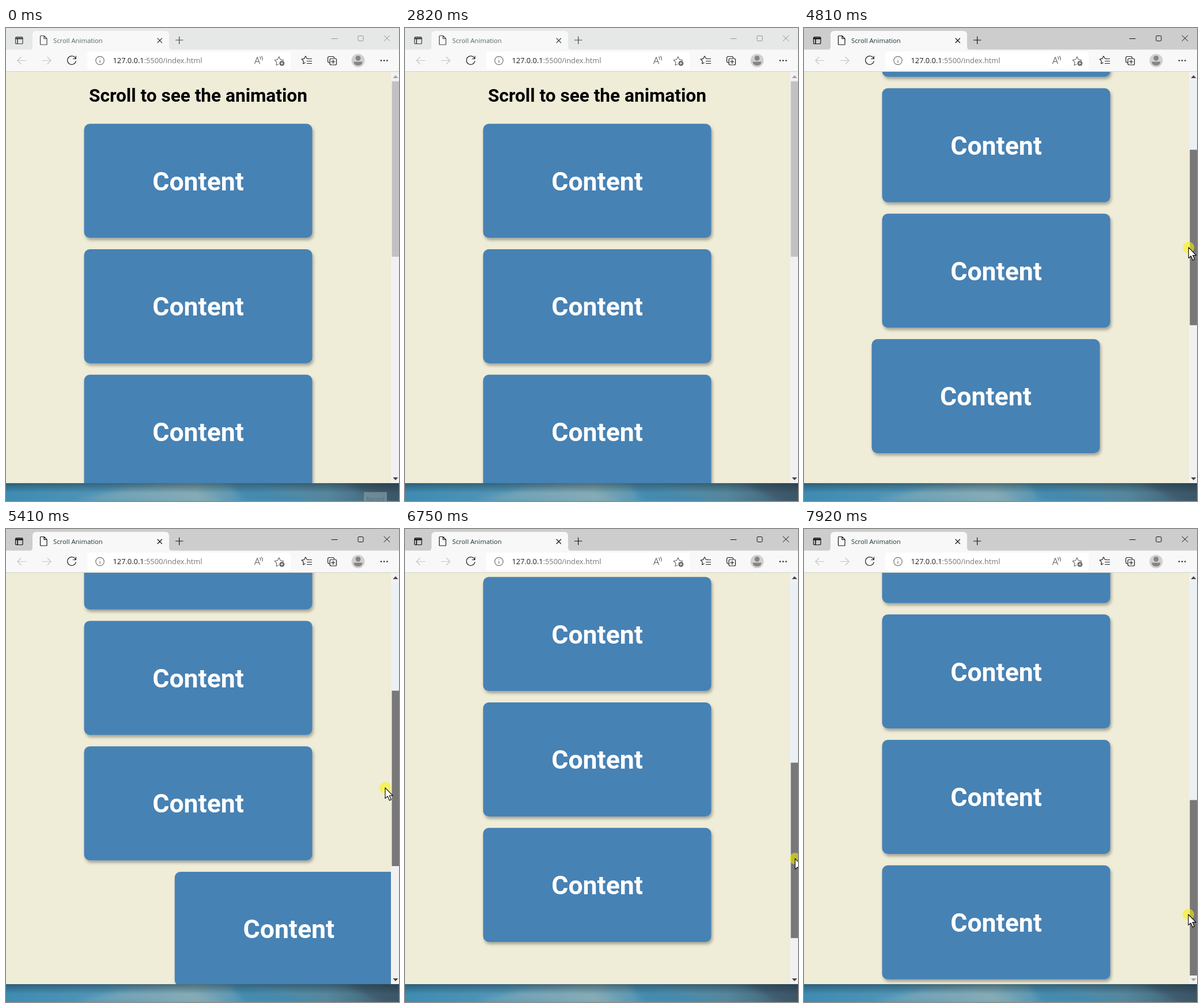
Write an HTML page that moves like this. It is 682 px wide and 821 px high and loops after 8000 ms.

```html
<!DOCTYPE html>
<html lang="en">
<head>
<meta charset="utf-8">
<title>Scroll Animation</title>
<style>
  html, body { margin: 0; width: 100%; height: 100%; overflow: hidden; background: #efecd7; }
  svg { display: block; width: 682px; height: 821px; }
  .ui { font-family: "Open Sans", "Noto Sans", sans-serif; }
  .page { font-family: Roboto, Arial, sans-serif; font-weight: 700; text-anchor: middle; }
  .line { fill: none; stroke-width: 1.2; stroke-linecap: round; stroke-linejoin: round; }
</style>
</head>
<body>
<svg viewBox="0 0 682 821" xmlns="http://www.w3.org/2000/svg">
  <defs>
    <clipPath id="view"><rect y="76" width="668" height="714"/></clipPath>
    <clipPath id="strip"><rect y="790" width="682" height="31"/></clipPath>
    <filter id="shadow" x="-5%" y="-8%" width="112%" height="120%">
      <feDropShadow dx="2" dy="4" stdDeviation="2.4" flood-color="#000" flood-opacity=".3"/>
    </filter>
    <filter id="soft" x="-20%" y="-60%" width="140%" height="220%"><feGaussianBlur stdDeviation="5"/></filter>
    <linearGradient id="desk">
      <stop offset="0" stop-color="#3f8bb2"/>
      <stop offset=".25" stop-color="#5095b7"/>
      <stop offset=".48" stop-color="#7ea7b3"/>
      <stop offset=".62" stop-color="#4f93b4"/>
      <stop offset=".82" stop-color="#55869c"/>
      <stop offset="1" stop-color="#3e5a6b"/>
    </linearGradient>
    <linearGradient id="edge" x2="0" y2="1">
      <stop offset="0" stop-color="#10222c" stop-opacity=".42"/>
      <stop offset="1" stop-color="#10222c" stop-opacity="0"/>
    </linearGradient>
  </defs>

  <!-- desktop -->
  <g clip-path="url(#strip)">
    <rect y="790" width="682" height="31" fill="url(#desk)"/>
    <g filter="url(#soft)">
      <path d="M120 821L210 800L300 797L380 821Z" fill="#8db0b8" opacity=".5"/>
      <path d="M390 790L470 805L540 821H410Z" fill="#3d86ae" opacity=".6"/>
      <path d="M590 790H682V821H650Z" fill="#364e60" opacity=".5"/>
    </g>
    <rect y="790" width="682" height="17" fill="url(#edge)"/>
  </g>
  <g id="record" class="ui">
    <rect x="621" y="805.5" width="40" height="18" fill="#7c97a3" opacity=".75"/>
    <text x="625" y="820.5" font-size="9.6" fill="#526b78">Record</text>
  </g>

  <!-- page -->
  <rect y="75" width="682" height="715" fill="#efecd7"/>
  <g clip-path="url(#view)" class="page">
    <text id="head" x="333.5" font-size="31.6">Scroll to see the animation</text>
    <g id="cards"></g>
  </g>

  <!-- scrollbar -->
  <rect x="668" y="76" width="14" height="714" fill="#f1f1f1"/>
  <rect id="trail" x="668" y="92.5" width="14" fill="#ebf0f5"/>
  <rect id="thumb" x="669.5" width="12.5" height="304.5"/>
  <path id="up" d="M671.5 87L676 82L680.5 87Z"/>
  <path id="down" d="M671.5 780L676 785L680.5 780Z"/>

  <!-- title bar -->
  <rect id="bar" width="682" height="38"/>
  <path d="M40 38Q46 38 46 32V12Q46 5 53 5H276Q283 5 283 12V32Q283 38 289 38Z" fill="#f8f8f8"/>
  <rect y="37.5" width="682" height="37.5" fill="#f8f8f8"/>
  <rect y="75" width="682" height="1" fill="#d3d3cb"/>
  <g id="chrome" class="line">
    <rect x="16.5" y="15.5" width="12.5" height="12" rx="2"/>
    <path d="M17 17.2H28.5M17 18.6H28.5M20 19V27" stroke-width="1.6"/>
    <path d="M59.5 14.5Q59.5 13.5 60.5 13.5H66L71 18.5V28Q71 29 70 29H60.5Q59.5 29 59.5 28ZM66 13.5V18.5H71"/>
    <path d="M263 18L270.5 25.5M270.5 18L263 25.5"/>
    <path d="M294.5 21H307M300.7 15V27.5"/>
  </g>
  <g id="buttons" class="line" style="stroke-width:1">
    <path d="M565 18.5H575M656 13L666 22.5M666 13L656 22.5"/>
    <rect x="611" y="13.5" width="9" height="9" rx="1.5"/>
  </g>
  <text id="tab" class="ui" x="82" y="26" font-size="11.3">Scroll Animation</text>

  <!-- toolbar -->
  <rect x="141" y="41" width="353" height="31" rx="4" fill="#fff"/>
  <g class="line" stroke="#c6c6c6">
    <path d="M35 56.5H20M26 50.5L20 56.5L26 62.5M63 56.5H78M72 50.5L78 56.5L72 62.5"/>
  </g>
  <g class="line" stroke="#242424" stroke-width="1.3">
    <path d="M120.8 53A7.4 7.4 0 1 0 121.3 57.5M121.3 48.8V53.5H116.6"/>
    <path d="M526 53.5L522.3 53L519.8 48.8L517.5 53.3L513 54L516.3 57.3L515.6 62L519 60.2M523.5 53.5H530.5M522.5 57.5H530.5M522.5 61.5H530.5"/>
    <path d="M562 60H561Q558.5 60 558.5 57.5V52Q558.5 49.5 561 49.5H567Q569.5 49.5 569.5 52"/>
    <rect x="562" y="53" width="11.5" height="11" rx="2.3"/>
    <path d="M567.7 55.5V61.5M564.7 58.5H570.7"/>
  </g>
  <g class="line" stroke="#707070" stroke-width="1.1">
    <circle cx="163" cy="56.5" r="7.2"/>
    <path d="M163 56V60M163 53V53.1"/>
    <path d="M431.5 62L436 50.5L440.5 62M433 58.3H439M440.5 50Q442.5 52 441.5 54.5M443.3 49Q446.3 52 444.8 56"/>
    <path d="M473 63L469 64.5L469.8 59.3L466.2 55.5L471.3 54.7L473.8 49.8L476.2 54.7L481.5 55.5L480.5 56.8"/>
  </g>
  <circle cx="478.8" cy="61.3" r="4.4" fill="#666"/>
  <path d="M476.5 61.3H481.1M478.8 59V63.6" stroke="#fff"/>
  <circle cx="611" cy="56.5" r="11.5" fill="#d2d0ce"/>
  <circle cx="611" cy="52.3" r="4.4" fill="#858585"/>
  <path d="M603.5 58.5H618.5Q618.5 65 611 65Q603.5 65 603.5 58.5Z" fill="#858585"/>
  <g fill="#242424"><circle cx="651" cy="56.5" r="1.3"/><circle cx="656.2" cy="56.5" r="1.3"/><circle cx="661.4" cy="56.5" r="1.3"/></g>
  <text class="ui" x="185.5" y="61" font-size="12.8" fill="#1c1c1c">127.0.0.1<tspan fill="#767676">:5500/index.html</tspan></text>

  <g id="cursor">
    <circle r="10" fill="#faf400" fill-opacity=".56"/>
    <path d="M0 0V18.5L4.2 14.8L7.4 22L10.4 20.7L7.3 13.6H13.2Z" fill="#fff" stroke="#000" stroke-width="1.1" stroke-linejoin="round"/>
  </g>
</svg>
<script>
const LOOP = 8000, PRESS = 3790, TRAVEL = 378, MAX_SCROLL = 889;
const FIRST = 166.3, PITCH = 217.75, COUNT = 7, TRIGGER = 648;
const SLIDE = 400, OFFSET = 1584;
const $ = id => document.getElementById(id);
const set = (el, attrs) => { for (const k in attrs) el.setAttribute(k, attrs[k]); };

// [time, thumb travel]
const drag = [[PRESS, 0], [4190, 36], [5160, 165.4], [5410, 188], [6230, 265], [6750, 313], [7920, 407]];

// [time, x, y]; the loop around the page lies between 1950 and 2720
const moves = [
  [490, 640, 835], [540, 641, 821], [640, 650, 819], [890, 650, 819], [1340, 578, 378], [1950, 578, 378],
  [2720, 609, 440], [2770, 668, 502], [2820, 710, 530], [3030, 710, 262], [3070, 679, 261], [3520, 677, 262],
  [PRESS, 677, 262], [4190, 677, 299], [5160, 662, 427], [5410, 658, 449], [6230, 674, 524],
  [6750, 677, 572], [7920, 667, 669]
];

function track(keys, t, col = 1, by = 0) {
  if (t <= keys[0][by]) return keys[0][col];
  for (let i = 1; i < keys.length; i++) {
    const a = keys[i - 1], b = keys[i];
    if (t <= b[by]) return a[col] + (b[col] - a[col]) * (t - a[by]) / (b[by] - a[by]);
  }
  return keys[keys.length - 1][col];
}

// cubic-bezier(.25, .1, .25, 1)
function ease(x) {
  if (x <= 0) return 0;
  if (x >= 1) return 1;
  let lo = 0, hi = 1, s;
  for (let i = 0; i < 20; i++) {
    s = (lo + hi) / 2;
    const bx = .75 * s * (1 - s) + s ** 3;
    if (bx < x) lo = s; else hi = s;
  }
  return .3 * s * (1 - s) ** 2 + 3 * s * s * (1 - s) + s ** 3;
}

const cards = Array.from({ length: COUNT }, (_, i) => {
  $('cards').insertAdjacentHTML('beforeend',
    `<g><rect x="135.5" width="396" height="198" rx="10" fill="#4682b4" filter="url(#shadow)"/>
     <text x="333.5" y="115.3" font-size="44.6" fill="#fff">Content</text></g>`);
  const top = FIRST + PITCH * i;
  const need = (top - TRIGGER) * TRAVEL / MAX_SCROLL;
  return {
    el: $('cards').lastElementChild, top,
    from: i % 2 ? -OFFSET : OFFSET,
    start: need > 0 ? track(drag, need, 0, 1) : -SLIDE
  };
});

function pointer(t) {
  if (t > 1950 && t < 2720) {
    const k = (t - 1950) / 770, a = .372 - 2 * Math.PI * k;
    return [316 + 301 * Math.cos(a) + 12 * k ** 4, 285 + 256 * Math.sin(a) + 62 * k ** 4];
  }
  return [track(moves, t), track(moves, t, 2)];
}

function draw(t) {
  const active = t >= PRESS, hover = t >= 3070;
  const travel = Math.min(TRAVEL, track(drag, t));
  const scroll = travel * MAX_SCROLL / TRAVEL;

  set($('head'), { y: 127.5 - scroll });
  for (const c of cards) {
    const x = c.from * (1 - ease((t - c.start) / SLIDE));
    set(c.el, { transform: `translate(${x} ${c.top - scroll})` });
  }

  set($('trail'), { height: travel });
  set($('thumb'), { y: 92.5 + travel, fill: active ? '#787878' : hover ? '#a8a8a8' : '#c1c1c1' });
  set($('up'), { fill: travel > 0 ? '#484444' : '#a3a3a3' });
  set($('down'), { fill: travel < TRAVEL ? '#504040' : '#a3a3a3' });

  set($('bar'), { fill: active ? '#cdcdcd' : '#e6e8e8' });
  set($('chrome'), { stroke: active ? '#161616' : '#444' });
  set($('buttons'), { stroke: active ? '#161616' : '#929292' });
  set($('tab'), { fill: active ? '#1c3538' : '#55666a' });
  set($('record'), { visibility: t < 50 ? 'visible' : 'hidden' });

  const [x, y] = pointer(t);
  set($('cursor'), { transform: `translate(${x} ${y})` });
}

const begin = performance.now();
function tick() {
  draw((performance.now() - begin) % LOOP);
  requestAnimationFrame(tick);
}
draw(0);
requestAnimationFrame(tick);
</script>
</body>
</html>
```
